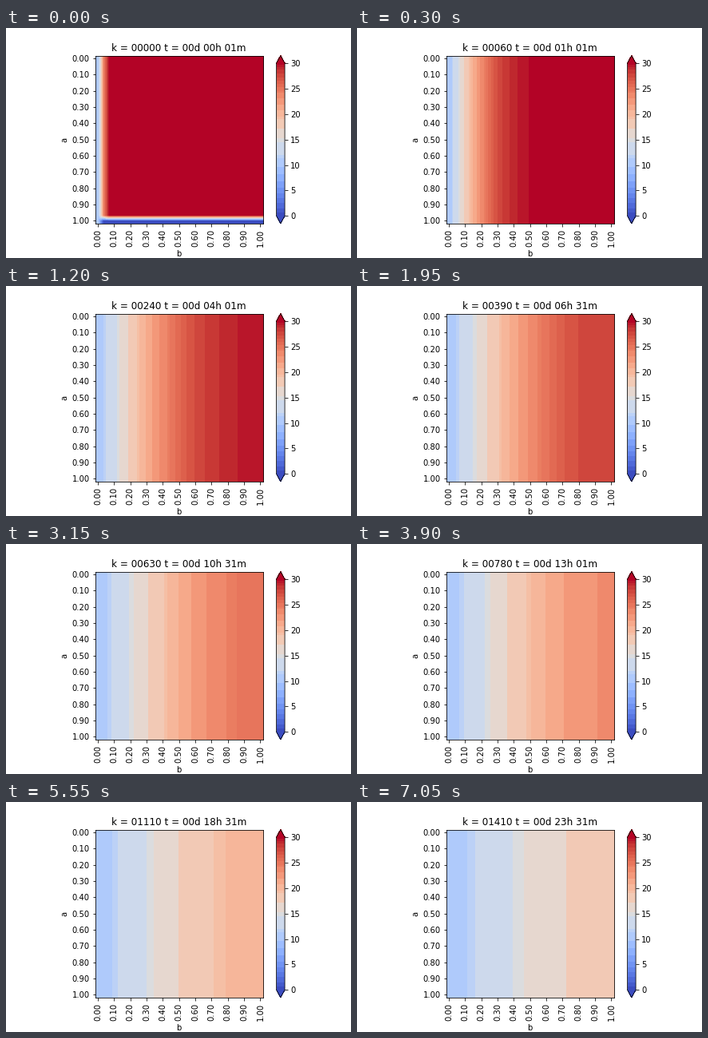
Animation, 432 px wide and 288 px high, one loop 7.2 s. Source, as a matplotlib script:

```python
import numpy as np
import matplotlib.pyplot as plt
from matplotlib.animation import FuncAnimation
from matplotlib.colors import ListedColormap

plt.rcParams["font.family"] = "DejaVu Sans"

N = 31             # grid points per side
R = 0.296          # diffusion number of one step (one minute)
FRAMES = 48
STEPS = 30         # steps between frames
T_MAX = 30.0
T_LEFT = 10.0

# temperature limits of the colour bands
LIMITS = [0.6, 1.5, 2.5, 3.5, 4.5, 5.6, 6.8, 8.2, 9.6,
          11.35, 11.95, 14.55, 15.2, 17.12, 19.05, 19.5, 20.72, 21.9, 23.1,
          24.22, 24.6, 25.3, 25.9, 26.5, 27.2, 27.95, 28.7, 29.25, 29.7]


def banded_cmap(n=600):
    base = plt.get_cmap("coolwarm")
    edges = np.array([0.0] + LIMITS + [T_MAX])
    mids = (edges[:-1] + edges[1:]) / 2
    mids[0], mids[-1] = 0.0, T_MAX
    temps = (np.arange(n) + 0.5) / n * T_MAX
    return ListedColormap(base(mids[np.searchsorted(LIMITS, temps)] / T_MAX))


def solve():
    """Profiles along b: fixed left end, insulated right end."""
    temp = np.full(N, T_MAX)
    temp[0] = T_LEFT
    profiles = []
    for k in range((FRAMES - 1) * STEPS + 1):
        temp[1:-1] += R * (temp[2:] - 2 * temp[1:-1] + temp[:-2])
        temp[-1] = temp[-2]
        if k % STEPS == 0:
            profiles.append(temp.copy())
    return profiles


def field(i):
    grid = np.tile(profiles[i], (N, 1))
    if i == 0:
        grid[-1, 1:] = 0    # cold bottom edge before the first update
    return grid


def caption(i):
    k = i * STEPS
    hours, minutes = divmod(k + 1, 60)
    days, hours = divmod(hours, 24)
    return f"k = {k:05d} t = {days:02d}d {hours:02d}h {minutes:02d}m"


profiles = solve()

fig, ax = plt.subplots(figsize=(6, 4), dpi=72)
fig.subplots_adjust(left=0.125, right=0.9, bottom=0.15, top=0.88)

image = ax.imshow(field(0), cmap=banded_cmap(), vmin=0, vmax=T_MAX,
                  interpolation="bilinear", interpolation_stage="data")
fig.colorbar(image, ax=ax, extend="both", ticks=range(0, 31, 5))

ticks = np.arange(0, N, 3)
labels = [f"{t / (N - 1):.2f}" for t in ticks]
ax.set_xticks(ticks, labels, rotation=90)
ax.set_yticks(ticks, labels)
ax.set_xlabel("b")
ax.set_ylabel("a")
title = ax.set_title(caption(0))


def update(i):
    image.set_data(field(i))
    title.set_text(caption(i))
    return image, title


anim = FuncAnimation(fig, update, frames=FRAMES, interval=150,
                     repeat=True, repeat_delay=0, blit=False)
plt.show()
```
